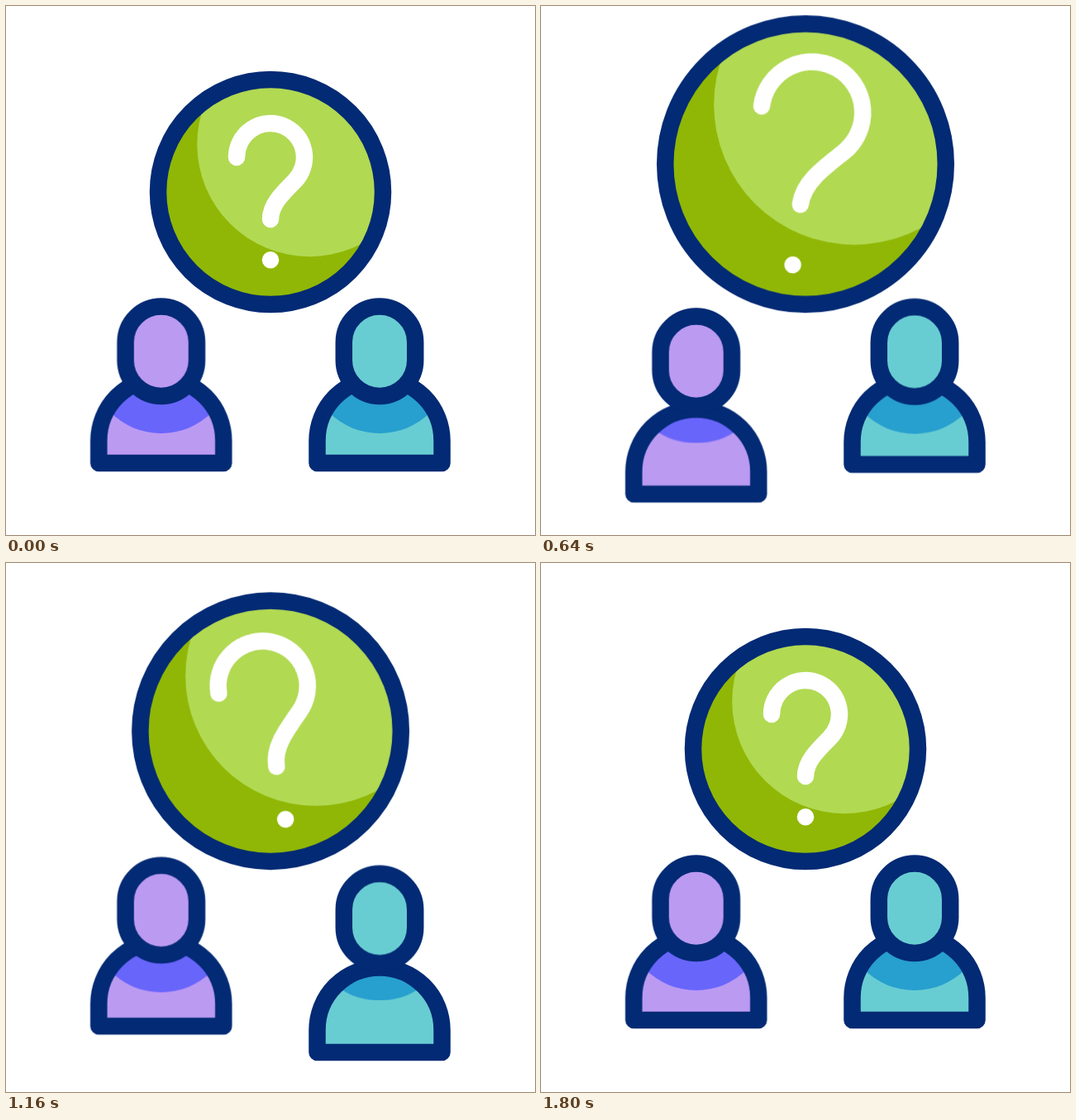
An HTML page that plays this animation: 640x640 px, repeating every 1.84 s.

```html
<!DOCTYPE html>
<html lang="en">
<head>
<meta charset="utf-8">
<title>Shared question</title>
<style>
  html, body { margin: 0; width: 100%; height: 100%; overflow: hidden; background: #fff; }
  svg { display: block; width: 100vw; height: 100vh; }

  .line {
    fill: none; stroke: #032a74; stroke-width: 20.5;
    stroke-linecap: round; stroke-linejoin: round;
    vector-effect: non-scaling-stroke;
  }
  .white { stroke: #fff; }
  .skin { fill: var(--skin); }
  .shade { fill: var(--shade); }
  .left { --skin: #bb9af2; --shade: #6865fb; --delay: 0s; }
  .right { --skin: #68cdd2; --shade: #279fcf; --delay: -1.48s; }

  .anim {
    animation: 1.84s cubic-bezier(.66, 0, .34, 1) infinite;
    animation-delay: var(--delay, 0s);
    transform-origin: 0 0;
  }
  .grow { animation-name: grow; }
  .lift { animation-name: lift; }
  .tilt { animation-name: tilt; }
  .zoom { animation-name: zoom; }
  .torso { animation-name: sink; --drop: 39px; }
  .head { animation-name: sink; --drop: 12.4px; }
  /* keeps the neck shadow in step with the head */
  .neck { animation-name: sink; --drop: -26.6px; }

  @keyframes grow {
    0%, 2.174%, 86.14%, 100% { transform: scale(1); }
    43.478% { transform: scale(1.26); }
  }
  @keyframes lift {
    0%, 2.174%, 86.14%, 100% { transform: translateY(0); }
    43.478% { transform: translateY(-35.4px); }
  }
  @keyframes zoom {
    0%, 2.174%, 86.14%, 100% { transform: scale(1); }
    43.478% { transform: scale(1.52); }
  }
  @keyframes tilt {
    0%, 2.174%, 86.685%, 100% { transform: rotate(0deg); }
    28.804% { transform: rotate(8deg); }
    57.609% { transform: rotate(-10deg); }
  }
  @keyframes sink {
    0%, 8.696%, 75%, 100% { transform: translateY(0); }
    41.304%, 42.391% { transform: translateY(var(--drop)); }
  }
</style>
</head>
<body>
<svg viewBox="0 0 640 640">
  <defs>
    <path id="torso" d="M-75.5 553V526a75.5 75.5 0 0 1 151 0V553Z"/>
    <rect id="head" x="-43.2" y="363.6" width="86.4" height="108.3" rx="43.2"/>
    <clipPath id="inTorso"><path d="M-75.5 553V526a75.5 75.5 0 0 1 151 0V553Z"/></clipPath>
    <clipPath id="inBall"><circle cy="-136" r="136"/></clipPath>
  </defs>

  <!-- ball, resting on its lowest point -->
  <g transform="translate(320 361)">
    <g class="anim grow">
      <circle cy="-136" r="136" fill="#90b705"/>
      <g clip-path="url(#inBall)"><circle cx="47.2" cy="-193.8" r="136" fill="#b1d952"/></g>
      <circle class="line" cy="-136" r="136"/>
    </g>
  </g>

  <!-- question mark, turning around the ball's centre -->
  <g transform="translate(320 225)">
    <g class="anim lift"><g class="anim tilt"><g class="anim zoom">
      <path class="line white" d="M-41-42A41 41 0 1 1 29-13C13 3 0 16 0 33"/>
      <path class="line white" d="M0 82.2h.01"/>
    </g></g></g>
  </g>

  <g class="left" transform="translate(187.7 0)">
    <g class="anim torso">
      <use href="#torso" class="skin"/>
      <g clip-path="url(#inTorso)"><circle class="shade anim neck" cy="430" r="87"/></g>
      <use href="#torso" class="line"/>
    </g>
    <g class="anim head">
      <use href="#head" class="skin"/>
      <use href="#head" class="line"/>
    </g>
  </g>

  <g class="right" transform="translate(452 0)">
    <g class="anim torso">
      <use href="#torso" class="skin"/>
      <g clip-path="url(#inTorso)"><circle class="shade anim neck" cy="430" r="87"/></g>
      <use href="#torso" class="line"/>
    </g>
    <g class="anim head">
      <use href="#head" class="skin"/>
      <use href="#head" class="line"/>
    </g>
  </g>
</svg>
</body>
</html>
```
